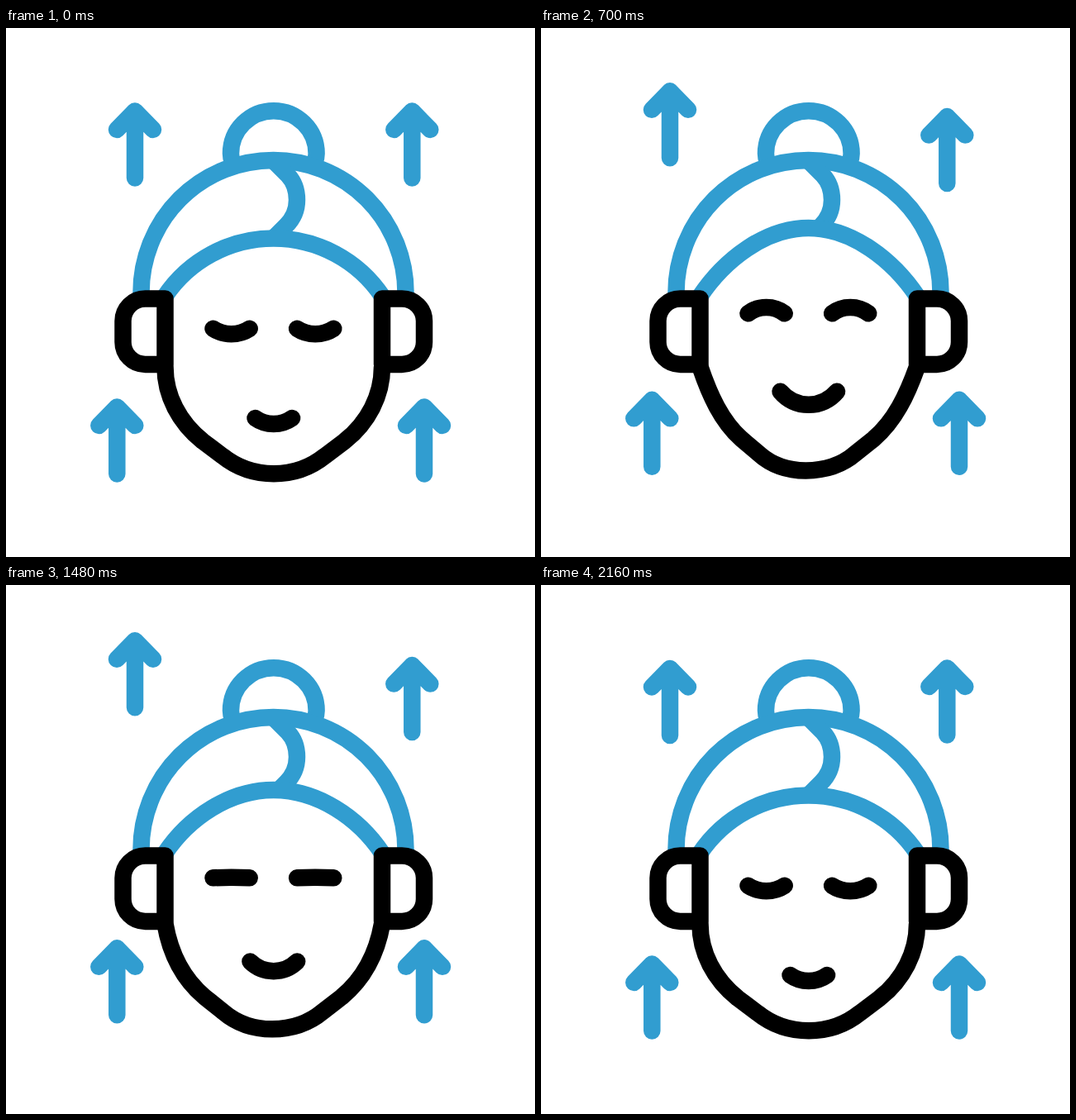
Write an HTML page that moves like this. It is 640 by 640 pixels and loops after 2400 ms.

```html
<!DOCTYPE html>
<html lang="en">
<head>
<meta charset="utf-8">
<title>Face lift</title>
<style>
  html, body { margin: 0; width: 100%; height: 100%; overflow: hidden; background: #fff; }
  svg { display: block; width: 100vw; height: 100vh; }
  path { fill: none; stroke-width: 20.5; stroke-linejoin: round; }
  .blue { stroke: #319dd0; }
  .dark { stroke: #000; stroke-linecap: round; }
  .arrow { stroke-linecap: round; }
</style>
</head>
<body>
<svg viewBox="0 0 640 640">
  <g class="blue">
    <g id="arrows"></g>
    <path d="M274 162Q272 157 272 152A51.8 51.8 0 0 1 375.6 152Q375.6 157 373.6 162"/>
    <path d="M163.5 324V320A160 160 0 0 1 483.5 320V324"/>
    <path id="strand"/>
    <path id="fringe"/>
  </g>
  <g class="dark">
    <path id="jaw"/>
    <path id="ear" d="M192.5 327.5V407H168.5A27 27 0 0 1 141.5 380V354.5A27 27 0 0 1 168.5 327.5Z"/>
    <use href="#ear" transform="translate(647.5) scale(-1 1)"/>
    <path id="eye"/>
    <use href="#eye" transform="translate(646.8) scale(-1 1)"/>
    <path id="mouth"/>
  </g>
</svg>
<script>
const LOOP = 2400, STEP = 20, BEAT = 410;
const HEIGHTS = [0, -46, 26, -46, 26, 0];

// Tip x, tip y, delay
const ARROWS = [
  [156, 100.5, 140],
  [491.3, 100.5, 20],
  [134.3, 458.5, 80],
  [506, 458.5, 80]
];

// Half a jaw from ear (0, 0) to chin (1, 1)
const JAW = [[0, 0], [0, .27], [.13, .52], [.346, .695], [.528, .834], [.67, .95], [.83, 1], [1, 1]];

const byId = id => document.getElementById(id);
const setPath = (id, d) => byId(id).setAttribute("d", d);

function ease(t, from, length) {
  const u = Math.min(1, Math.max(0, (t - from) / length));
  return u * u * (3 - 2 * u);
}

function lift(t, delay) {
  return HEIGHTS.slice(1).reduce((y, height, i) =>
    y + (height - HEIGHTS[i]) * ease(t, delay + i * BEAT, BEAT), 0);
}

// A shallow arc between two level ends; positive sag hangs down
function bow(cx, y, half, sag) {
  const inner = half * (.33 + .3 * Math.abs(sag / half));
  const dip = y + sag * 4 / 3;
  return `M${cx - half} ${y}C${cx - inner} ${dip} ${cx + inner} ${dip} ${cx + half} ${y}`;
}

// Smiling pulls the cheeks inwards and the chin up
function jaw(smile) {
  const chinX = 324 - 4 * smile, chinY = 539.3 - 4.3 * smile, top = 410;
  const side = ear => JAW.map(([u, v]) => {
    const pull = .1 * smile * Math.sin(Math.PI * Math.sqrt(v));
    return [ear + (chinX - ear) * (u + pull), top + (chinY - top) * v];
  });
  const left = side(192.5), right = side(455).reverse();
  const curve = (points, i) => "C" + points.slice(i, i + 3).join(" ");
  return `M${left[0]}${curve(left, 1)}L${left[4]}${curve(left, 5)}` +
    `${curve(right, 1)}L${right[4]}${curve(right, 5)}`;
}

const arrows = ARROWS.map(([x, y, delay]) => {
  const el = document.createElementNS("http://www.w3.org/2000/svg", "path");
  el.setAttribute("class", "arrow");
  el.setAttribute("d", "M-22 22.5L0 0L22 22.5M0 0V81");
  byId("arrows").append(el);
  return { el, x, y, delay };
});

function draw(t) {
  for (const { el, x, y, delay } of arrows) {
    el.setAttribute("transform", `translate(${x} ${y + lift(t, delay)})`);
  }
  const smile = ease(t, 120, 720) - ease(t, 1100, 720);
  const peak = 254.5 - 14 * smile, tuck = 13 * smile;
  setPath("fringe", `M192 325C221.3 281 271 ${peak} 323.75 ${peak}S426.2 281 455.5 325`);
  setPath("strand", "M323 160L341 178C348.5 186 352 196 352 208S347 231 339 239" +
    `L${324 + tuck} ${254 - tuck}`);
  setPath("jaw", jaw(smile));
  setPath("eye", bow(272.6, 363.7 - 20.4 * smile, 22.1, 6.5 - 15.4 * smile));
  setPath("mouth", bow(323.8, 472 - 35.8 * smile, 22.3 + 13.3 * smile, 7 + 10 * smile));
}

const start = performance.now();
function tick() {
  const t = (performance.now() - start) % LOOP;
  draw(Math.floor(t / STEP) * STEP);
  requestAnimationFrame(tick);
}
tick();
</script>
</body>
</html>
```
